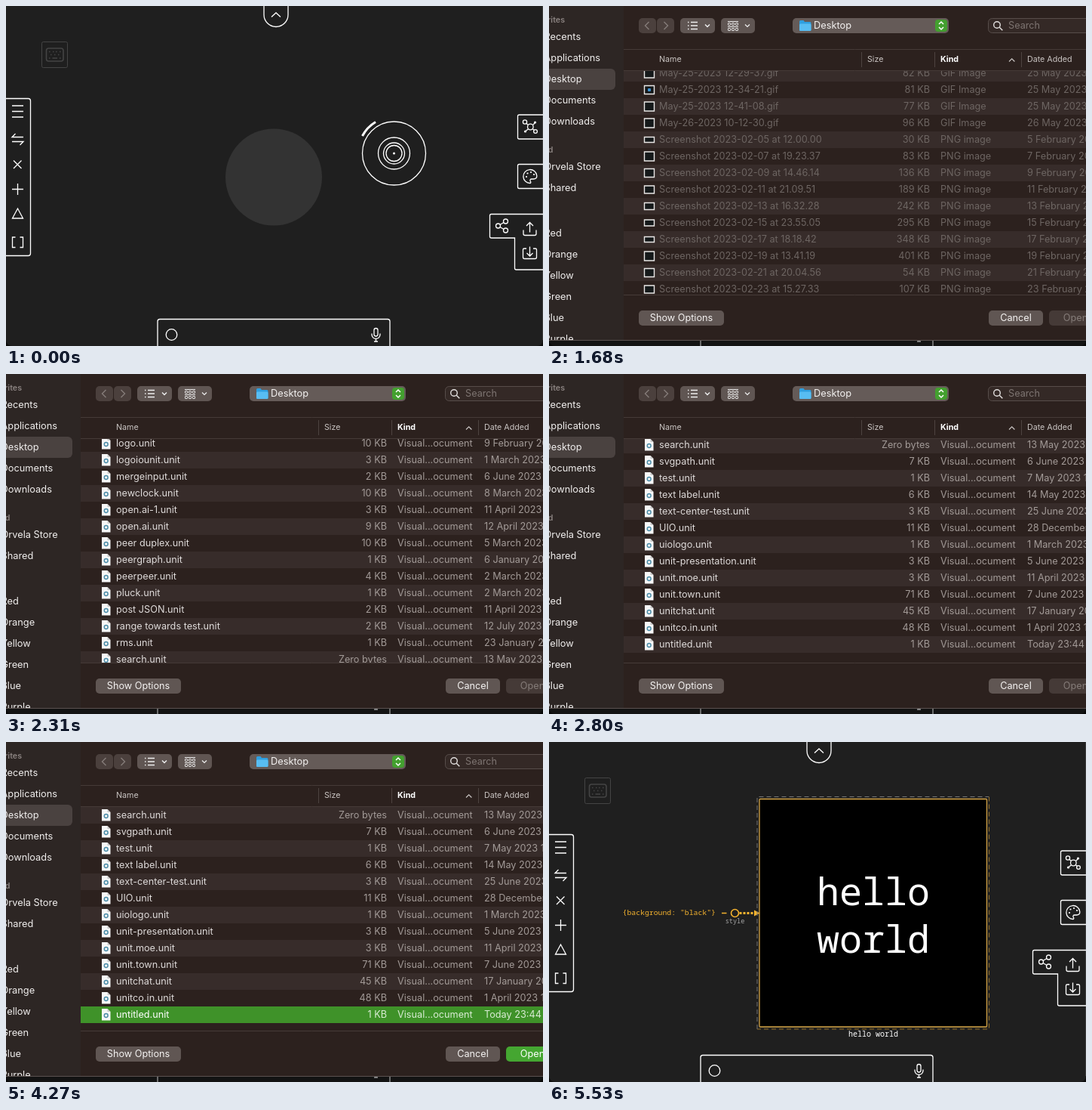
Write an HTML page with a canvas that moves like this. It is 712x450 px and loops after 5950 ms.

```html
<!DOCTYPE html>
<html lang="en">
<head>
<meta charset="utf-8">
<title>Open file dialog</title>
<style>
html, body { margin: 0; width: 100%; height: 100%; overflow: hidden; background: #000; }
canvas { display: block; }
</style>
</head>
<body>
<canvas id="stage" width="712" height="450"></canvas>
<script>
const g = document.getElementById('stage').getContext('2d');
const LOOP = 5950, STEP = 70;
const SANS = 'Inter, "Open Sans", sans-serif', MONO = '"Noto Sans Mono", "DejaVu Sans Mono", monospace';
const AMBER = '#f5b32f', DIM = '#6d6562', BUTTON = '#60565a'.replace('5a', '53');
const MONTHS = 'January February March April May June July August September October November December'.split(' ');

// ---------- drawing helpers ----------
function line(d, color = '#fff', width = 1.3) {
  g.strokeStyle = color;
  g.lineWidth = width;
  g.stroke(new Path2D(d));
}
function shape(d, color) {
  g.fillStyle = color;
  g.fill(new Path2D(d));
}
function circle(x, y, r, color = '#fff', width = 0) {
  g.beginPath();
  g.arc(x, y, r, 0, 7);
  paint(color, width);
}
function box(x, y, w, h, r, color, width = 0) {
  g.beginPath();
  g.roundRect(x, y, w, h, r);
  paint(color, width);
}
function paint(color, width) {
  g.fillStyle = g.strokeStyle = color;
  g.lineWidth = width;
  width ? g.stroke() : g.fill();
}
function text(s, x, y, color, { size = 12.7, align = 'left', weight = 400, font = SANS, base = 'middle' } = {}) {
  g.font = `${weight} ${size}px ${font}`;
  g.textAlign = align;
  g.textBaseline = base;
  g.fillStyle = color;
  g.fillText(s, x, y);
}

// ---------- file list ----------
const pad = n => String(n).padStart(2, '0');
const longDate = (d, m, y = 2023) => `${+d} ${MONTHS[m - 1]} ${y} 12:00`;

function imageRow(entry) {
  const [name, size, height, date] = entry.split('|');
  const shot = name.match(/(\d+)-(\d+)-(\d+) at/), clip = name.match(/^(\w{3})-(\d+)/);
  const when = date || (shot ? longDate(shot[3], shot[2])
    : longDate(clip[2], MONTHS.findIndex(m => m.startsWith(clip[1])) + 1));
  return { name: shot ? 'Screenshot ' + name : name + '.gif', size, height: +height, date: when,
    kind: shot ? 'PNG image' : 'GIF Image' };
}
function unitRow(entry) {
  const [name, size, day, month, year] = entry.split('|');
  return { name: name + '.unit', size: size === '0' ? 'Zero bytes' : size + ' KB', unit: true,
    date: month ? longDate(day, month, year) : day, kind: 'Visual...ocument' };
}
function shots(count, day) {
  return Array.from({ length: count }, (_, i) => {
    const d = day + i * 2, m = 1 + Math.floor(d / 28);
    return `2023-${pad(m)}-${pad(d % 28 + 1)} at ${pad(12 + i * 7 % 12)}.${pad(i * 23 % 60)}.${pad(i * 37 % 60)}|${30 + i * 53 % 400} KB|${7 + i * 5 % 6}`;
  });
}

const rows = [
  { name: 'minime-insta.ipynb', size: '9 KB', kind: 'Document', date: longDate(13, 6) },
  ...[
    '41|1 MB|8|Yesterday 20:11', '42|229 KB|10|Today 23:30', 'Apr-04-2023 02-08-02|1,2 MB|12',
    'Apr-28-2023 22-40-37|94 KB|11', 'Jul-12-2023 20-40-34|223 KB|12', 'Jul-14-2023 23-39-38|455 KB|10|Today 23:39',
    'Mar-16-2023 16-12-44|896 KB|12', 'May-13-2023 15-20-42|259 KB|12', 'May-25-2023 09-43-14|23 KB|12',
    'May-25-2023 12-27-19|108 KB|12', 'May-25-2023 12-29-37|82 KB|12', 'May-25-2023 12-34-21|81 KB|11',
    'May-25-2023 12-41-08|77 KB|12', 'May-26-2023 10-12-30|96 KB|12',
    ...shots(20, 32),
    '2023-03-15 at 02.04.21|29 KB|9', '2023-03-18 at 01.29.57|1,5 MB|9', '2023-03-18 at 01.30.59|35 KB|7',
    '2023-03-25 at 18.52.51|43 KB|12', '2023-03-26 at 16.57.57|19 KB|7', '2023-03-31 at 22.52.46|57 KB|12',
    '2023-04-22 at 23.36.21|246 KB|11', '2023-04-30 at 12.23.14|277 KB|14', '2023-04-30 at 18.46.37|78 KB|9',
    '2023-05-01 at 19.34.31|67 KB|12', '2023-05-06 at 19.18.55|157 KB|12', '2023-05-14 at 15.58.21|553 KB|10',
    '2023-05-14 at 15.59.26|83 KB|12', '2023-05-15 at 01.09.01|227 KB|12',
    ...shots(9, 128)
  ].map(imageRow),
  ...[
    'circle|2|4|3', 'clock|9|8|3', 'counter|3|12|4', 'duplex|8|5|3', 'graph|1|6|1', 'hash|2|11|4', 'input|4|6|6', 'label|3|14|5',
    'logo|10|9|2', 'logoiounit|3|1|3', 'mergeinput|2|6|6', 'newclock|10|8|3', 'open.ai-1|3|11|4', 'open.ai|9|12|4',
    'peer duplex|10|5|3', 'peergraph|1|6|1', 'peerpeer|4|2|3', 'pluck|1|2|3', 'post JSON|2|11|4',
    'range towards test|2|12|7', 'rms|1|23|1', 'search|0|13|5', 'svgpath|7|6|6', 'test|1|7|5', 'text label|6|14|5',
    'text-center-test|3|25|6', 'UIO|11|28|12|2022', 'uiologo|1|1|3', 'unit-presentation|3|5|6', 'unit.moe|3|11|4',
    'unit.town|71|7|6', 'unitchat|45|17|1', 'unitco.in|48|1|4', 'untitled|1|Today 23:44'
  ].map(unitRow)
];

const specks = { 'Jul-12': '#43c04b', 'May-13': '#8fd69a', 'May-25-2023 12-34': '#3c8fd0', '42.': '#ddd', '12.23.14': '#d08a6a' };

function fileIcon(row, y) {
  if (row.height) {
    const h = row.height, w = h === 14 ? 10 : 13;
    box(133 - w / 2, y - h / 2, w, h, 0, '#15191a');
    const key = Object.keys(specks).find(k => row.name.includes(k));
    if (key) box(131, y - 2, 4, 4, 1, specks[key]);
    box(133 - w / 2, y - h / 2, w, h, 0, '#e9e7e6', 1.4);
    return;
  }
  shape(`M127 ${y - 8}h7.5l4 4v11.5h-11.5z`, '#f7f7f7');
  shape(`M134.5 ${y - 8}v4h4z`, '#c9c9c9');
  if (row.unit) circle(132.7, y + 1, 2.4, '#4b8ca8', 1.5);
  else line(`M129.500 ${y}h6M129.500 ${y + 3}h6`, '#d5d5d5', 1);
}

function fileList(scroll, selected) {
  g.save();
  g.beginPath();
  g.rect(99, 86, 613, 296);
  g.clip();
  rows.forEach((row, i) => {
    const y = 102 + 22 * i - scroll, chosen = selected && i === rows.length - 1;
    if (y < 70 || y > 400) return;
    if (chosen || i % 2) box(99, y - 11, 613, 22, 0, chosen ? '#3f9229' : '#372c2a');
    fileIcon(row, y);
    const minor = chosen ? '#d9ecd4' : row.unit ? '#a29a97' : DIM;
    text(row.name, 146, y, chosen ? '#fff' : row.unit ? '#dedad9' : DIM);
    text(row.size, 505, y, minor, { align: 'right' });
    text(row.kind, 519, y, minor);
    text(row.date, 634, y, minor);
  });
  g.restore();
}

// ---------- dialog ----------
function sidebar() {
  box(0, -20, 99, 463, 0, '#2d2624');
  box(-10, 83, 98, 28, 6, '#4a4240');
  const head = { size: 10.7, weight: 600, align: 'right' };
  text('Favourites', 21, 19, '#8b8381', head);
  text('Synced', 5.5, 191, '#8b8381', head);
  const items = { Recents: 41, Applications: 69, Desktop: 97, Documents: 125, Downloads: 153, 'Orvela Store': 213,
    Shared: 241, Red: 301, Orange: 329, Yellow: 357, Green: 385, Blue: 413, Purple: 441 };
  for (const name in items) text(name, -6.5, items[name], '#f0eeed', { size: 12.8 });
}

function toolbar() {
  box(119, 16, 23, 20, 5, '#4b403d');
  box(143, 16, 23, 20, 5, '#4b403d');
  line('M132.500 21l-5 5 5 5M152.500 21l5 5-5 5', '#857c79', 1.4);
  box(174, 16, 46, 20, 5, BUTTON);
  line('M184 21.500h1.500M184 26h1.500M184 30.500h1.500M188 21.500h9M188 26h9M188 30.500h9M207 24.500l3 3 3-3', '#eee', 1.4);
  box(228, 16, 45, 20, 5, BUTTON);
  line('M237 20.500h14M237 27.500h14M260 24.500l3 3 3-3', '#eee', 1.2);
  for (let i = 0; i < 6; i++) box(237.5 + i % 3 * 5, i < 3 ? 22.5 : 29.5, 3, 3, .6, '#eee', 1);
  box(323, 16, 207, 20, 5, '#655b58');
  shape('M332 20.500q0-1.500 1.500-1.500h4l1.500 2h7q1.500 0 1.500 1.500v9q0 1.500-1.500 1.500h-12.500q-1.500 0-1.500-1.500z', '#2f9fe0');
  box(332, 23.5, 15.5, 9.5, 1.5, '#58bdf2');
  text('Desktop', 351, 26, '#f4f2f1', { size: 12.8 });
  box(512, 18, 16, 16, 4, '#43a02f');
  line('M517 24l3-3 3 3M517 28l3 3 3-3', '#fff', 1.5);
  box(582.5, 16.5, 150, 19, 5, '#342926');
  box(582.5, 16.5, 150, 19, 5, '#574d4a', 1);
  circle(594, 25, 4.3, '#e2dfde', 1.4);
  line('M597.300 28.300l4 4', '#e2dfde', 1.4);
  text('Search', 609, 26, '#7d7471');

  line('M99 57.500H712M99 85.500H712M99 382.500H712', '#453a37', 1);
  line('M414.500 61V81M511.500 61V81M626.500 61V81', '#4d4340', 1);
  const small = { size: 10.7 };
  text('Name', 146, 71, '#c9c4c2', small);
  text('Size', 422, 71, '#c9c4c2', small);
  text('Kind', 519, 71, '#fff', { size: 10.7, weight: 700 });
  text('Date Added', 634, 71, '#c9c4c2', small);
  line('M610 73.500l3.700-3.700 3.700 3.700', '#c9c4c2', 1.2);
}

function button(label, x, w, back, color) {
  box(x, 403, w, 20, 5, back);
  text(label, x + w / 2, 413, color, { align: 'center' });
}

function dialog(offset, scroll, selected) {
  g.fillStyle = 'rgba(0,0,0,.4)';
  g.fillRect(0, 0, 712, 450);
  g.save();
  g.translate(0, offset);
  box(0, -20, 712, 463, 0, '#2c211e');
  fileList(scroll, selected);
  toolbar();
  g.save();
  g.beginPath();
  g.rect(0, -20, 712, 463);
  g.clip();
  sidebar();
  g.restore();
  button('Show Options', 119, 113, BUTTON, '#f4f2f1');
  button('Cancel', 583, 72, BUTTON, '#f4f2f1');
  button('Open', 663, 70, selected ? '#45a631' : '#453a37', selected ? '#fff' : '#857c79');
  line('M0 442.500H712', '#5b5250', 1);
  g.restore();
}

// ---------- editor ----------
function editor() {
  g.fillStyle = '#0c0c0c';
  g.fillRect(0, 0, 712, 450);
  box(0, -20, 712, 470, 8, '#1f1f1f');
  line('M711.500 0V442', '#3c3c3c', 1);

  line('M342 -2V11.500a16 16 0 0 0 32 0V-2M352 14.500l6-5.500 6 5.500');
  box(47.5, 47.5, 34, 34, 2, '#444', 1);
  box(53.5, 56, 22.5, 17, 3, '#444', 1.6);
  line('M57 60.500h1.500M62 60.500h1.500M66 60.500h1.500M71 60.500h1.500M59 64.500h1.500M64 64.500h1.500M69 64.500h1.500M57 69h1.500M61.500 69h6.500M71 69h1.500', '#444', 1.5);

  box(-5, 122.5, 37.5, 208, 3, '#fff', 1.3);
  line('M8 132h15M8 139.500h15M8 147h15');
  line('M12.500 169L8 173.500H23M8 179.500H23L18.500 184');
  line('M10 204.500l10.500 10.500M20.500 204.500l-10.500 10.500');
  line('M8 242.500h15M15.500 235v15M15.500 268l-7 13h14z');
  line('M12.500 306H8.500v13.500h4M18.500 306h4v13.500h-4');

  box(678.5, 144, 40, 32, 2, '#fff', 1.3);
  circle(695.3, 160, 3.8, '#fff', 1.3);
  circle(688, 153.5, 2.6, '#fff', 1.3);
  circle(702, 166, 2.4, '#fff', 1.3);
  circle(701.5, 154, 1.6);
  circle(688.5, 166, 1.6);
  line('M690 155.500l2.500 2M698.500 157.500l3-3M692.500 162.800l-4 3.200M698.200 162.500l2 1.800');

  box(678.5, 209.5, 40, 32, 2, '#fff', 1.3);
  line('M695 234.500a9 9 0 1 1 8.800-10c.4 3.500-2 4.500-4.300 4.500h-2.500c-2 0-2.700 1.700-1.700 3 .8 1.200.6 2.500-.3 2.500z');
  [[690, 226], [691.5, 221.5], [696, 220], [700, 223]].forEach(([x, y]) => circle(x, y, 1.1));

  line('M714 275.500H643.500q-2 0-2 2V305q0 2 2 2h31V347q0 2 2 2H714');
  circle(652.5, 291, 3, '#fff', 1.3);
  circle(662.5, 285, 3, '#fff', 1.3);
  circle(662.5, 297, 3, '#fff', 1.3);
  line('M655 289.500l5-3M655 292.500l5 3');
  line('M694.500 299.500V286.500M690 291l4.500-4.500 4.500 4.500M686 296.500v5q0 2 2 2h13q2 0 2-2v-5');
  line('M694.500 318.500V331M690.500 327l4 4 4-4M690 321h-3q-1.500 0-1.500 1.500V332.500q0 2 2 2h14q2 0 2-2V322.500q0-1.500-1.500-1.500h-3');

  box(201, 414.5, 308, 50, 3, '#fff', 1.3);
  circle(219.5, 435, 7.3, '#fff', 1.3);
  box(488, 426.5, 5, 10.5, 2.5, '#fff', 1.3);
  line('M485 433.500v1.500a5.500 5.500 0 0 0 11 0v-1.500M490.500 440.500v3.500M488 444h5');

  circle(355, 226.5, 64, '#333');
}

function pointer(x, y) {
  [42, 21, 14, 10.5].forEach(r => circle(x, y, r, '#fff', 1.3));
  circle(x, y, 1.5);
  line(`M${x - 42} ${y - 23}A48 48 0 0 1 ${x - 24.5} ${y - 41.500}`, '#fff', 3);
}

function result(t) {
  const grow = 1 - (1 - Math.min(1, (t - 4480) / 350)) ** 3;
  const mono = (size, align = 'left', base = 'middle') => ({ size, align, base, font: MONO });
  g.save();
  g.globalAlpha = grow;
  g.translate(429.5, 226.5);
  g.scale(grow, grow);
  g.translate(-429.5, -226.5);
  box(279, 75.5, 301.5, 301.5, 1, '#000');
  box(279, 75.5, 301.5, 301.5, 1, '#d5a546', 1.3);
  text('hello', 430, 215.5, '#fff', mono(50, 'center', 'alphabetic'));
  text('world', 430, 279, '#fff', mono(50, 'center', 'alphabetic'));
  circle(246.5, 226.5, 5, AMBER, 1.6);
  g.setLineDash([3, 2]);
  line('M252.500 226.500H272', AMBER, 3);
  g.setLineDash([]);
  shape('M272 222.500l7.500 4-7.500 4z', AMBER);
  text('style', 246.5, 238, '#a5a5a5', mono(8.5, 'center'));
  g.restore();
  if (t >= 4900) {
    text('{background: "black"}', 97.5, 226.5, AMBER, mono(9.8));
    line('M229 226.500h6.500', AMBER, 1.5);
  }
  if (t >= 5530) {
    g.setLineDash([6, 4]);
    line('M276 380V72.500H583', '#777', 1);
    line('M583.500 72.500V380H276', '#94702a', 1);
    g.setLineDash([]);
    text('hello world', 430, 387, '#fff', mono(10, 'center'));
  }
}

// ---------- timeline ----------
function fling(t, start, steps, from, to, power) {
  const x = Math.min(1, (t - start + STEP) / (steps * STEP));
  return Math.round(from + (to - from) * (1 - (1 - x) ** power));
}
function scrollAt(t) {
  if (t < 1680) return 0;
  if (t < 2240) return fling(t, 1680, 7, 0, 960, 2);
  if (t < 2870) return fling(t, 2240, 9, 960, 1746, 4.05);
  return t < 2940 ? 1745 : t < 3080 ? 1744 : 1743;
}
function offsetAt(t) {
  if (t < 4270) return -Math.round(120 * .1 ** ((t - 910) / STEP));
  return -Math.round(443 * ((t - 4270) / 210) ** 2);
}

function draw() {
  const t = Math.floor(performance.now() % LOOP / STEP) * STEP;
  editor();
  if (t < 630) pointer(514.5, 195);
  else if (t < 700) pointer(652, 289);
  if (t >= 910 && t < 4480) dialog(offsetAt(t), scrollAt(t), t >= 3290);
  if (t > 4480) result(t);
  requestAnimationFrame(draw);
}
draw();
</script>
</body>
</html>
```
